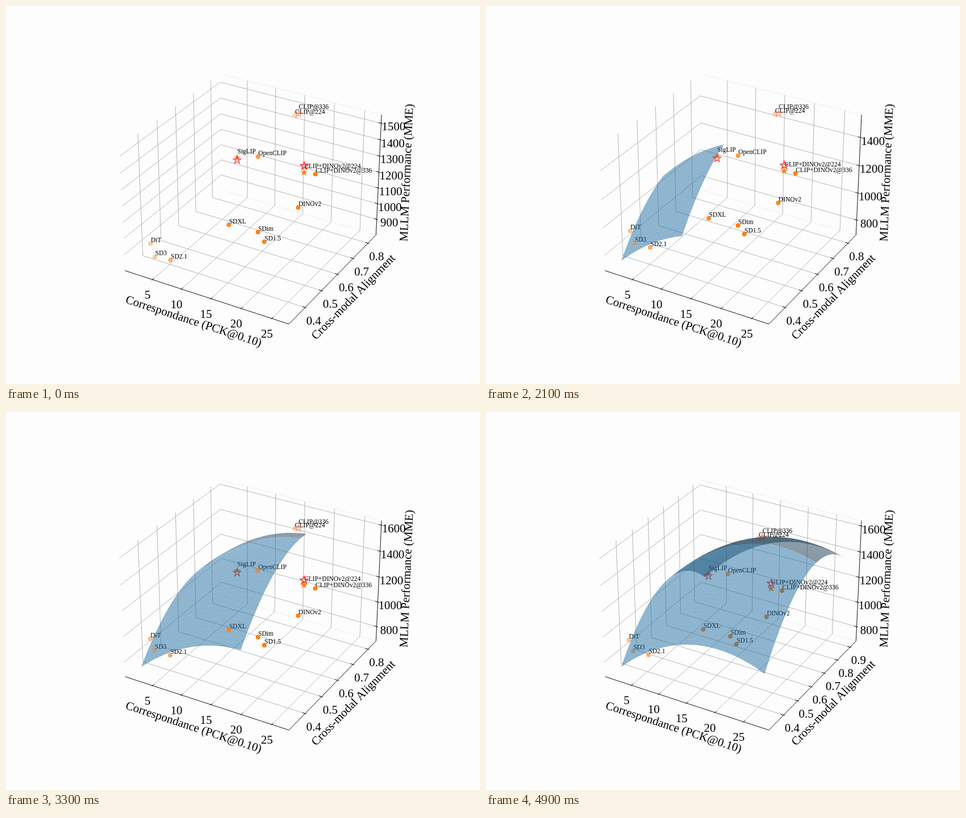
An HTML page with a canvas for the animation above (5000 ms loop, 837 by 669 pixels).

```html
<!DOCTYPE html>
<html lang="en">
<head>
<meta charset="utf-8">
<title>MLLM performance surface</title>
<style>
html, body { margin: 0; width: 100%; height: 100%; overflow: hidden; background: #fdfdfd; }
canvas { display: block; }
</style>
</head>
<body>
<canvas id="stage" width="837" height="669"></canvas>
<script>
const ctx = document.getElementById('stage').getContext('2d');
const FONT = '"Liberation Serif", "Times New Roman", serif';
const STEP = 100, COUNT = 50;

// Data range of the scatter points: correspondence, alignment, score
const LO = [1.93, 0.34, 846], HI = [25.99, 0.82, 1504];
const CELL = [(HI[0] + 2 - LO[0]) / 49, (HI[1] + 0.1 - LO[1]) / 49];
const SIZE = [8 / 7, 8 / 7, 6 / 7];

const dots = [
  ['DiT', 1.95, 0.391, 905], ['SD3', 3.13, 0.377, 848], ['SD2.1', 7.09, 0.34, 910],
  ['SDXL', 16.38, 0.3615, 1211], ['SDim', 20.83, 0.371, 1207], ['SD1.5', 21.93, 0.368, 1165],
  ['DINOv2', 24.48, 0.47, 1300], ['OpenCLIP', 16.18, 0.5326, 1460],
  ['CLIP+DINOv2@336', 25.99, 0.512, 1475], ['CLIP@224', 14.4, 0.816, 1455]
];
const stars = [
  ['SigLIP', 13.24, 0.5147, 1440], ['CLIP+DINOv2@224', 23.49, 0.539, 1435],
  ['CLIP@336', 15.66, 0.792, 1500]
];
const rings = [
  ['', 13.24, 0.5147, 1426], ['', 23.49, 0.539, 1473], ['', 15.66, 0.792, 1497]
];

let lo, hi;   // current view limits

const height = (i, j) =>
  743.5 + 22.83 * i + 28.5 * j - 0.345 * i * i + 0.071 * i * j - 0.523 * j * j;

// Box coordinates (0 at the centre) to [x, y, nearness], azimuth -60, elevation 30
function camera(a, b, c) {
  const w = 0.433 * a - 0.75 * b + 0.5 * c, k = 2785 / (10 - w);
  return [435.9 + k * (0.866 * a + 0.5 * b),
          330.9 - k * (-0.25 * a + 0.433 * b + 0.866 * c), w];
}

const norm = (v, k) => ((v - lo[k]) / (hi[k] - lo[k]) - 0.5) * SIZE[k];
const project = (x, y, z) => camera(norm(x, 0), norm(y, 1), norm(z, 2));

function path(points, closed) {
  ctx.beginPath();
  for (const p of points) ctx.lineTo(p[0], p[1]);
  if (closed) ctx.closePath();
}

function line(color, ...points) {
  path(points);
  ctx.strokeStyle = color;
  ctx.lineWidth = 0.93;
  ctx.stroke();
}

function label(text, x, y, size, align = 'center', angle = 0, drop = 0) {
  ctx.save();
  ctx.translate(x, y);
  ctx.rotate(angle * Math.PI / 180);
  ctx.font = size + 'px ' + FONT;
  ctx.textAlign = align;
  ctx.fillStyle = '#000';
  ctx.fillText(text, 0, drop);
  ctx.restore();
}

function setLimits(n) {
  const min = [...LO], max = [...HI];
  if (n > 0) {
    min[2] = height(0, 0);
    for (let k = 0; k < 2; k++) max[k] = Math.max(max[k], LO[k] + CELL[k] * (n - 1));
    for (let i = 0; i < n; i++)
      for (let j = 0; j < n; j++) max[2] = Math.max(max[2], height(i, j));
  }
  const pad = max.map((m, k) => 0.05 * (m - min[k]));
  lo = min.map((m, k) => m - pad[k]);
  hi = max.map((m, k) => m + pad[k]);
}

function ticks(k, step) {
  const out = [];
  for (let m = Math.ceil(lo[k] / step); m * step <= hi[k]; m++) out.push(m * step);
  return out;
}

function drawAxes() {
  const E = 25 / 42, H = 25 / 56, IN = 0.019, OUT = 0.0095;
  const grid = '#b0b0b0', pane = '#efefef';
  line(pane, camera(-E, E, H), camera(E, E, H));
  line(pane, camera(-E, E, -H), camera(E, E, -H));

  const steps = [5, 0.1, hi[2] - lo[2] > 800 ? 200 : 100];
  const marks = steps.map((s, k) => ticks(k, s).map(v => [v, norm(v, k)]));
  for (const [, a] of marks[0]) line(grid, camera(a, -E, -H), camera(a, E, -H), camera(a, E, H));
  for (const [, b] of marks[1]) line(grid, camera(E, b, -H), camera(-E, b, -H), camera(-E, b, H));
  for (const [, c] of marks[2]) line(grid, camera(-E, -E, c), camera(-E, E, c), camera(E, E, c));

  line('#000', camera(-E, -E, -H), camera(E, -E, -H));
  line('#000', camera(E, -E, -H), camera(E, E, -H));
  line('#000', camera(E, E, -H), camera(E, E, H));

  const tick = (text, at, from, to, dx, dy) => {
    line('#000', from, to);
    label(text, at[0] + dx, at[1] + dy + 7, 20.9);
  };
  for (const [v, a] of marks[0])
    tick(v, camera(a, -E, -H), camera(a, -E + IN, -H), camera(a, -E - OUT, -H), -8.8, 26.8);
  for (const [v, b] of marks[1])
    tick(v.toFixed(1), camera(E, b, -H), camera(E - IN, b, -H), camera(E + OUT, b, -H), 15.2, 23);
  for (const [v, c] of marks[2])
    tick(v, camera(E, E, c), camera(E - IN, E, c), camera(E + OUT, E, c), 22, 5.8);

  label('Correspondance (PCK@0.10)', 331, 559.5, 20.9, 'center', 18.1, 4.8);
  label('Cross-modal Alignment', 614.5, 516, 20.9, 'center', -45.7, 4.8);
  label('MLLM Performance (MME)', 709, 295, 20.9, 'center', -87.6, 4.8);
}

function drawNames(group, rise) {
  for (const [name, ...p] of group) {
    const [x, y] = project(...p);
    label(name, x + 0.5, y - rise, 11.5, 'left');
  }
}

function starPath(x, y, r) {
  const points = [];
  for (let k = 0; k < 10; k++) {
    const a = k * Math.PI / 5, d = k % 2 ? r * 0.382 : r;
    points.push([x + d * Math.sin(a), y - d * Math.cos(a)]);
  }
  path(points, true);
}

function dotMark(x, y) {
  ctx.beginPath();
  ctx.arc(x, y, 4, 0, 7);
  ctx.fill();
}

function starMark(x, y) {
  starPath(x, y, 6.8);
  ctx.fill();
}

function ringMark(x, y) {
  starPath(x, y, 7.2);
  ctx.stroke();
}

// A layer of markers; the farther ones are paler
function markerLayer(group, mark) {
  const spots = group.map(([, ...p]) => project(...p));
  const depth = spots.map(s => s[2]);
  const far = Math.min(...depth), near = Math.max(...depth);
  const paint = () => {
    ctx.fillStyle = '#ff7f0e';
    ctx.strokeStyle = '#f00';
    ctx.lineWidth = 1.16;
    for (const [x, y, w] of spots) {
      ctx.globalAlpha = 0.3 + 0.7 * (w - far) / (near - far);
      mark(x, y);
    }
    ctx.globalAlpha = 1;
  };
  return { near, paint };
}

function shade(i, j) {
  const a = -(22.83 - 0.69 * i + 0.071 * j) / CELL[0];
  const b = -(28.5 - 1.046 * j + 0.071 * i) / CELL[1];
  const lit = (-2 * a - 2 * b + 1) / 3 / Math.hypot(a, b, 1);
  return 0.65 + 0.35 * lit;
}

function surfaceLayer(n) {
  const rows = Array.from({ length: n }, (_, j) => Array.from({ length: n }, (_, i) =>
    project(LO[0] + i * CELL[0], LO[1] + j * CELL[1], height(i, j))));
  const near = Math.max(...rows.flat().map(p => p[2]));
  const paint = () => {
    for (let j = n - 2; j >= 0; j--)
      for (let i = 0; i < n - 1; i++) {
        const f = shade(i + 0.5, j + 0.5);
        ctx.fillStyle = `rgba(${31 * f}, ${119 * f}, ${180 * f}, 0.5)`;
        path([rows[j][i], rows[j][i + 1], rows[j + 1][i + 1], rows[j + 1][i]], true);
        ctx.fill();
      }
  };
  return { near, paint };
}

function draw(n) {
  ctx.fillStyle = '#fdfdfd';
  ctx.fillRect(0, 0, 837, 669);
  setLimits(n);
  drawAxes();
  drawNames(dots, 2.6);
  drawNames(stars, 7.5);
  // Whole layers are stacked by their nearest point
  const layers = [markerLayer(dots, dotMark), markerLayer(stars, starMark),
                  markerLayer(rings, ringMark), surfaceLayer(n)];
  layers.sort((a, b) => a.near - b.near).forEach(l => l.paint());
}

let start, shown = -1;
function loop(now) {
  start ??= now;
  const n = Math.floor((now - start) / STEP) % COUNT;
  if (n !== shown) draw(shown = n);
  requestAnimationFrame(loop);
}
requestAnimationFrame(loop);
</script>
</body>
</html>
```
